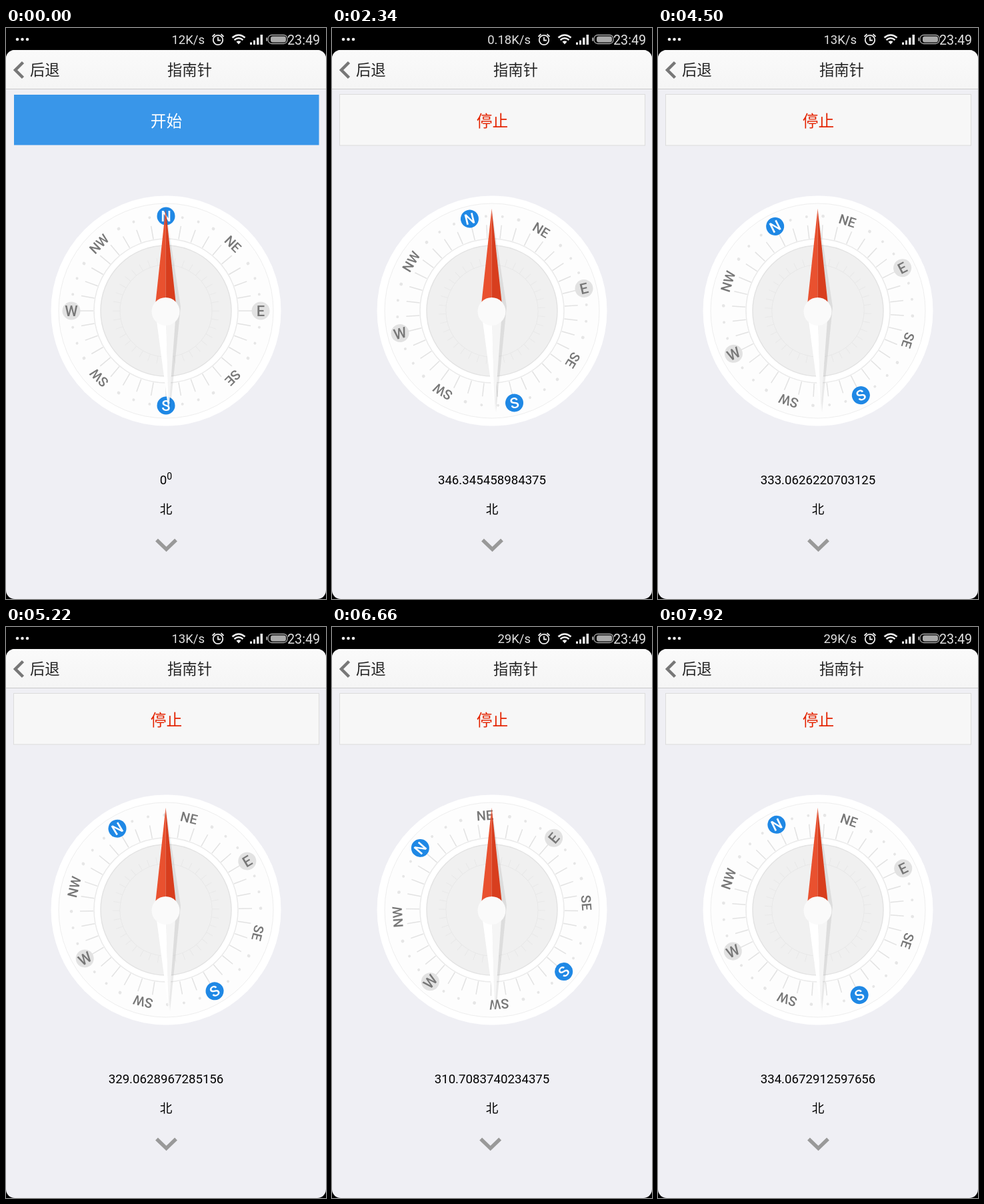
Write an HTML page that moves like this. It is 480 px wide and 856 px high and loops after 8 s.

```html
<!DOCTYPE html>
<html lang="zh">
<head>
<meta charset="utf-8">
<style>
html, body { margin: 0; width: 100%; height: 100%; overflow: hidden; background: #000; }
svg { display: block; font-family: Roboto, "Noto Sans CJK SC", "Noto Sans CJK", sans-serif; }
.mid { text-anchor: middle; }
.bar { font-size: 18.5px; fill: #e2e2e2; }
.line { fill: none; stroke: #e8e8e8; }
</style>
</head>
<body>
<svg width="480" height="856" viewBox="0 0 480 856">
  <defs>
    <linearGradient id="head" x2="0" y2="1"><stop stop-color="#fafafa"/><stop offset="1" stop-color="#f5f5f5"/></linearGradient>
    <clipPath id="page"><rect y="33" width="480" height="823" rx="13"/></clipPath>
  </defs>
  <rect width="480" height="856"/>

  <!-- status bar -->
  <g fill="#eee">
    <circle cx="17" cy="17" r="2.3"/><circle cx="24.5" cy="17" r="2.3"/><circle cx="32" cy="17" r="2.3"/>
    <path d="M366 21.500h3v3.500h-3zM371 18.500h3v6.500h-3zM376 14.500h3.500v10.500h-3.500zM381.500 10h3.500v15h-3.500z"/>
  </g>
  <g fill="none" stroke="#eee" stroke-width="1.8">
    <circle cx="318" cy="18" r="7.2"/><path d="M318 13.500v5h4M309.500 13l4-3.800M326.500 13l-4-3.800"/>
    <path d="M339.500 14.500q9.500-8 19 0M342.500 18q6.500-5.500 13 0" stroke-width="2.6"/>
    <path d="M345.500 20.500q3.500-2.500 7 0l-3.500 4z" fill="#eee" stroke="none"/>
    <rect x="393" y="10.500" width="29" height="13" rx="5.5" stroke="#aaa" stroke-width="1.3"/>
    <path d="M391 14.500v5" stroke="#aaa"/>
    <rect x="397" y="12.500" width="23" height="9" rx="3" fill="#aaa" stroke="none"/>
  </g>
  <text id="speed" class="bar" x="298" y="24" text-anchor="end"></text>
  <text class="bar" x="422" y="24.500" style="font-size:19.7px">23:49</text>

  <g clip-path="url(#page)">
    <rect y="33" width="480" height="823" fill="#efeff4"/>
    <rect y="33" width="480" height="59" fill="url(#head)"/>
    <path d="M0 91.500h480" stroke="#c9c9c9"/>
  </g>
  <path d="M25.500 51.500l-11.500 11.500 11.500 11.500" fill="none" stroke="#777" stroke-width="4.5"/>
  <g font-size="22.3" fill="#222">
    <text x="36" y="71">后退</text>
    <text class="mid" x="275.5" y="71">指南针</text>
  </g>

  <rect id="button"/>
  <text id="label" class="mid" x="240.5" y="147.5" font-size="23.7"></text>

  <!-- compass -->
  <g transform="translate(240 424)">
    <circle r="172.5" fill="#fff"/>
    <circle r="161" fill="#fdfdfd" stroke="#eee"/>
    <circle r="108" fill="#fff" stroke="#eaeaea" stroke-width="1.5"/>
    <circle r="98" fill="#f0f0f0" stroke="#e3e3e3" stroke-width="1.5"/>
    <g id="dial"><circle class="line" r="69"/></g>
    <path d="M0-150L22-6L6 152L-2 0z" fill="#000" opacity=".08"/>
    <path d="M-.5-153L-17 0H-.5z" fill="#e9512f"/>
    <path d="M-.5-153L16 0H-.5z" fill="#d83e1e"/>
    <path d="M-16 0H0L4 151z" fill="#fff"/>
    <path d="M15 0H-.5L4 151z" fill="#f5f5f5"/>
    <circle cx="-.5" cy="1" r="21" fill="#fafafa"/>
  </g>

  <g class="mid" font-size="18.67">
    <text id="value" x="240" y="683.5"></text>
    <text id="zero" x="240" y="683.5">0<tspan font-size="14" dy="-7">0</tspan></text>
    <text x="240" y="728">北</text>
  </g>
  <path id="arrow" d="M226 767.500l14.500 14 14.500-14" fill="none" stroke="#999" stroke-width="5.5"/>
</svg>
<script>
const STEP = 180, LOOP = 8000;
const $ = id => document.getElementById(id);

function add(tag, attrs, text = '') {
  const el = document.createElementNS('http://www.w3.org/2000/svg', tag);
  for (const k in attrs) el.setAttribute(k, attrs[k]);
  el.textContent = text;
  $('dial').append(el);
}

function set(id, attrs) {
  for (const k in attrs) $(id).setAttribute(k, attrs[k]);
}

for (let a = 0; a < 360; a += 10) {
  const transform = `rotate(${a})`;
  add('path', { d: 'M0-109V-129', stroke: '#e2e2e2', 'stroke-width': 1.5, transform });
  add('path', { d: 'M0-69V-80', stroke: '#e8e8e8', transform });
  if (a % 90 && a % 90 !== 40 && a % 90 !== 50)
    add('circle', { cy: -142, r: a % 30 ? 2 : 2.4, fill: '#e6e6e6', transform });
}
['N', 'NE', 'E', 'SE', 'S', 'SW', 'W', 'NW'].forEach((name, i) => {
  const turn = i * 45, main = i % 2 === 0, blue = i % 4 === 0;
  const transform = `rotate(${turn}) translate(0 -142)` + (main ? ` rotate(${-turn})` : '');
  if (main) add('circle', { r: 13.5, fill: blue ? '#1f88e5' : '#e2e2e2', transform });
  add('text', {
    class: 'mid', y: main ? 7.8 : 7.2, transform,
    'font-size': main ? 22 : 20, 'font-weight': 500,
    'font-family': 'Roboto, sans-serif', fill: blue ? '#fff' : '#777'
  }, name);
});

// [time, heading]
const headings = [
  [1080, 348.9127], [1800, 348.9127], [2340, 346.345458984375], [2880, 338.2148],
  [3240, 338.0713], [3420, 338.0713], [3780, 337.06231689453125], [5220, 329.0628967285156],
  [6120, 299.05047607421875], [7200, 322.36627197265625], [7920, 334.0672912597656]
];

function heading(t) {
  const i = Math.max(1, headings.findIndex(h => h[0] >= t));
  const [t0, a] = headings[i - 1], [t1, b] = headings[i];
  const p = Math.max(0, (t - t0) / (t1 - t0));
  return Math.fround(p === 1 ? b : a + (b - a) * p);
}

function shake(t) {
  if (t < 540) return 4 * Math.sin(Math.PI * t / 270);
  if (t >= 5400 && t < 7380) return -4 * Math.sin(Math.PI * (t - 6120) / 720);
  return 0;
}

function draw(now) {
  const t = Math.floor(now % LOOP / STEP) * STEP;
  const angle = heading(t), read = t >= 1080, running = t >= 1260;

  $('speed').textContent = t < 720 ? '12K/s' : t < 3600 ? '0.18K/s' : t < 5940 ? '13K/s' : '29K/s';
  set('button', running
    ? { x: 11.5, y: 99.5, width: 458, height: 76.5, fill: '#f7f7f7', stroke: '#dcdcdc' }
    : { x: 12, y: 100, width: 457.5, height: 75.5, fill: t < 900 ? '#3996e9' : '#2f7fc8', stroke: 'none' });
  $('label').textContent = running ? '停止' : '开始';
  set('label', { fill: running ? '#e42300' : '#fff' });
  set('dial', { transform: `rotate(${running ? angle : 0})` });
  $('value').textContent = read ? angle : '';
  set('zero', { visibility: read ? 'hidden' : 'visible' });
  set('arrow', { transform: `translate(${shake(t).toFixed(2)} 0)` });
  requestAnimationFrame(draw);
}
requestAnimationFrame(draw);
</script>
</body>
</html>
```
